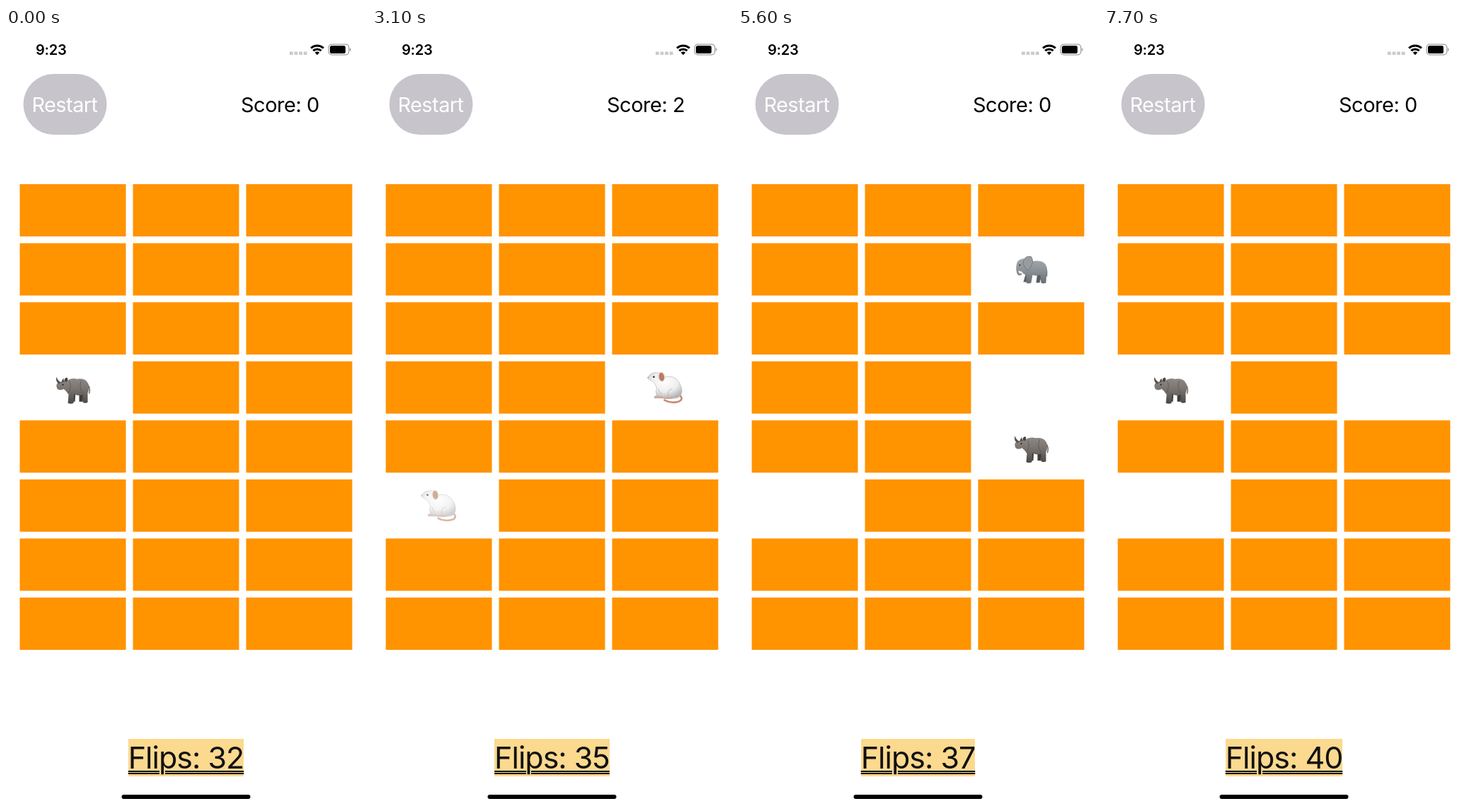
These frames come from a looping animation (509x1101 px, 8 s). An HTML page:

```html
<!DOCTYPE html>
<html lang="en">
<head>
<meta charset="utf-8">
<title>Memory card game</title>
<style>
  html, body { margin: 0; width: 100%; height: 100%; overflow: hidden; background: #fff; }
  body { position: relative; font-family: Inter, sans-serif; }
  svg { position: absolute; left: 0; top: 0; display: block; }
  #footer { position: absolute; left: 0; top: 1006px; width: 509px; text-align: center; }
  #flips {
    display: inline-block; height: 53px; line-height: 53px; background: #fbd98f;
    font-size: 43px; letter-spacing: -1px; color: #111; white-space: nowrap;
    text-decoration: underline double 2px; text-underline-offset: 3px;
  }
</style>
</head>
<body>
<svg width="509" height="1101" viewBox="0 0 509 1101">
  <defs>
    <linearGradient id="hide" x2="0" y2="1">
      <stop stop-color="#8e8984"/><stop offset=".45" stop-color="#77726e"/><stop offset="1" stop-color="#4b4744"/>
    </linearGradient>
    <linearGradient id="grey" x2="0" y2="1">
      <stop stop-color="#a3a8ac"/><stop offset=".5" stop-color="#8b9094"/><stop offset="1" stop-color="#686d72"/>
    </linearGradient>
    <radialGradient id="fur" cx=".5" cy=".35" r=".65">
      <stop stop-color="#fff"/><stop offset=".6" stop-color="#ededee"/><stop offset="1" stop-color="#b4b3b6"/>
    </radialGradient>
    <pattern id="spots" width="5" height="5" patternUnits="userSpaceOnUse" patternTransform="rotate(25)">
      <path d="M0 0H5V5H0Z" fill="#e0ad55"/>
      <path d="M.6 .8L3 .4L4.3 2L3.4 4.2L1 3.8Z" fill="#8a5420"/>
    </pattern>

    <g id="rhino">
      <path d="M-2 5H4L3 20H-3ZM9 5H16L14 20H9Z" fill="#3e3b39"/>
      <path d="M22 -3Q25 2 23 9" fill="none" stroke="#4b4744" stroke-width="1.2"/>
      <path d="M-23 -1Q-24 -6 -19 -7Q-14 -10 -8 -10Q-2 -14 6 -12Q18 -14 22 -5Q24 1 21 8L21 21Q18 23 14 21L14 10Q8 13 2 9L1 22Q-3 24 -7 22L-6 10Q-9 5 -13 2Q-18 5 -22 2Z" fill="url(#hide)"/>
      <path d="M-20 -5Q-25 -9 -23 -15Q-21 -9 -16 -7ZM-16 -7Q-16 -11 -13 -13Q-13 -10 -12 -8Z" fill="#59534e"/>
      <path d="M-12 -9Q-12 -14 -8 -14Q-6 -11 -9 -8Z" fill="#46413e"/>
      <path d="M-5 -9Q-1 -1 -6 7M12 -10Q8 0 14 8" fill="none" stroke="#4b4744" stroke-opacity=".55"/>
      <circle cx="-14" cy="-4" r="1" fill="#171514"/>
    </g>

    <g id="mouse">
      <path d="M20 10Q27 17 19 20Q8 23 -1 18" fill="none" stroke="#c98b73" stroke-width="2.6" stroke-linecap="round"/>
      <path d="M-25 -14Q-20 -22 -11 -21Q-4 -20 0 -15Q13 -18 20 -7Q28 7 19 14Q10 17 -7 15L-15 15Q-17 13 -12 11Q-14 6 -12 0Q-14 -6 -18 -9Q-24 -11 -25 -14Z" fill="url(#fur)" stroke="#bcbbbe" stroke-width=".7"/>
      <path d="M5 13Q1 4 10 2M-10 2Q-8 8 -5 9" fill="none" stroke="#b9b8bb"/>
      <path d="M-14 14H-4M-1 15H9" stroke="#d8a18c" stroke-width="2" stroke-linecap="round"/>
      <ellipse cx="-5" cy="-15" rx="4.3" ry="6.5" fill="#b87d65" stroke="#ead9d2" stroke-width="1.2" transform="rotate(-8 -5 -15)"/>
      <circle cx="-16" cy="-15" r="1.3" fill="#3c1713"/>
      <circle cx="-24" cy="-14" r="1" fill="#d59d91"/>
    </g>

    <g id="elephant">
      <path d="M-7 4H0L-5 18H-11ZM9 4H16L12 19H7Z" fill="#595e63"/>
      <path d="M21 -4Q23 3 22 10" fill="none" stroke="#656a6e" stroke-width="1.3"/>
      <path d="M-21 -5Q-20 -14 -12 -15Q-5 -16 0 -11Q8 -13 15 -11Q23 -8 22 2L21 19Q17 21 14 19L13 8Q7 10 2 8L0 19Q-4 21 -7 19L-7 8Q-11 7 -14 3Q-18 1 -17 5Q-16 7 -14 5L-13 7Q-17 11 -20 6Q-22 1 -21 -5Z" fill="url(#grey)"/>
      <path d="M-11 -12Q-8 -20 0 -18Q5 -11 -2 -1Q-5 3 -9 -3Q-13 -8 -11 -12Z" fill="#979ca0" stroke="#697075" stroke-width=".8"/>
      <path d="M-17 2Q-18 5 -13 4" fill="none" stroke="#f4f1e7" stroke-width="1.5"/>
      <circle cx="-16" cy="-6" r="1" fill="#222"/>
    </g>

    <g id="giraffe">
      <path d="M-3 7L-5 18L-8 23M11 7L10 15L13 23" fill="none" stroke="#b98339" stroke-width="2"/>
      <path d="M15 0Q20 3 20 11" fill="none" stroke="#875b2b" stroke-width="1.2"/>
      <path d="M20 9L22 14L19 13Z" fill="#3b2718"/>
      <path d="M-16 -21L-11 -19Q-8 -9 1 -3Q13 -4 17 3L16 11L18 24H15L12 12Q6 10 1 10L0 24H-3L-3 9Q-9 5 -10 -3Z" fill="url(#spots)" stroke="#b98339" stroke-width=".5"/>
      <path d="M-22 -16Q-21 -20 -17 -22L-12 -21L-11 -17Q-16 -17 -20 -14Z" fill="#dba851"/>
      <path d="M-16 -22L-17 -25M-14 -22L-14 -25M-12 -20L-9 -22" stroke="#65401d" stroke-width="1.3"/>
      <path d="M-9 23H-6M-4 24H0M12 23H15M15 24H19" stroke="#352519" stroke-width="1.7"/>
      <circle cx="-16" cy="-19" r=".9" fill="#20140c"/>
    </g>
  </defs>

  <!-- Status bar -->
  <text x="42" y="38" font-size="20" font-weight="600" letter-spacing="-.2">9:23</text>
  <path d="M401 35.7H426" stroke="#cbcbcd" stroke-width="4.6" stroke-dasharray="4.8 1.8"/>
  <g fill="none" stroke="#000" stroke-width="3">
    <path d="M431.1 28.5A13 13 0 0 1 448.9 28.5M434.3 32.2A8.3 8.3 0 0 1 445.7 32.2"/>
  </g>
  <path d="M440 38.2L436.8 34.8A4.6 4.6 0 0 1 443.2 34.8Z"/>
  <rect x="456.2" y="23.2" width="28.6" height="14.6" rx="4.4" fill="none" stroke="#999" stroke-width="1.2"/>
  <rect x="458" y="25" width="22" height="11" rx="2.6"/>
  <path d="M486.2 28Q489 30.5 486.2 33Z" fill="#888"/>

  <rect x="24.5" y="65" width="118" height="86" rx="43" fill="#c7c4cb"/>
  <text x="83" y="119" font-size="28.8" letter-spacing="-.5" text-anchor="middle" fill="#fff">Restart</text>
  <text id="score" x="332" y="119" font-size="29" letter-spacing="-.5"></text>
  <g id="cards" fill="#ff9300"></g>
  <use class="face"/>
  <use class="face"/>
  <rect x="163.5" y="1085" width="182" height="6" rx="3"/>
</svg>
<div id="footer"><span id="flips"></span></div>

<script>
const LOOP = 8000, FIRST_FLIP = 32;
const MATCHED = [11, 15];

// [time, card index, animal]
const turns = [
  [-1000, 9, 'rhino'], [100, 15, 'mouse'], [1900, 11, 'mouse'],
  [2900, 15, 'mouse'], [3900, 14, 'rhino'], [4900, 5, 'elephant'],
  [5700, 4, 'giraffe'], [6500, 3, 'elephant'], [7200, 9, 'rhino']
];

const byId = id => document.getElementById(id);
const cardX = i => 19.5 + 160 * (i % 3);
const cardY = i => 221 + 83.57 * Math.floor(i / 3);

const cards = Array.from({ length: 24 }, (_, i) => {
  const card = document.createElementNS('http://www.w3.org/2000/svg', 'rect');
  const box = { x: cardX(i), y: cardY(i), width: 150, height: 74 };
  for (const key in box) card.setAttribute(key, box[key]);
  return byId('cards').appendChild(card);
});
const faces = document.querySelectorAll('.face');

function fadeIn(elapsed) {
  const p = Math.min(1, (elapsed + 130) / 560);
  return p * p * (3 - 2 * p);
}

function showTurn(n) {
  // Every second turn completes a pair; the next one turns it back.
  const open = n % 2 ? [turns[n - 1], turns[n]] : [turns[n]];
  const away = open.map(turn => turn[1]).concat(n > 3 ? MATCHED : []);
  cards.forEach((card, i) => card.style.display = away.includes(i) ? 'none' : '');
  faces.forEach((face, i) => {
    face.style.display = open[i] ? '' : 'none';
    if (!open[i]) return;
    const [, index, animal] = open[i];
    face.setAttribute('href', '#' + animal);
    face.setAttribute('x', cardX(index) + 75);
    face.setAttribute('y', cardY(index) + 37);
    face.setAttribute('opacity', 1);
  });
  byId('score').textContent = 'Score: ' + (n === 3 || n === 4 ? 2 : 0);
  byId('flips').textContent = 'Flips: ' + (FIRST_FLIP + n);
}

let current = -1;
function draw() {
  const t = performance.now() % LOOP;
  const n = turns.filter(turn => turn[0] <= t).length - 1;
  if (n !== current) showTurn(current = n);
  faces[n % 2].setAttribute('opacity', fadeIn(t - turns[n][0]));
  requestAnimationFrame(draw);
}
draw();
</script>
</body>
</html>
```
